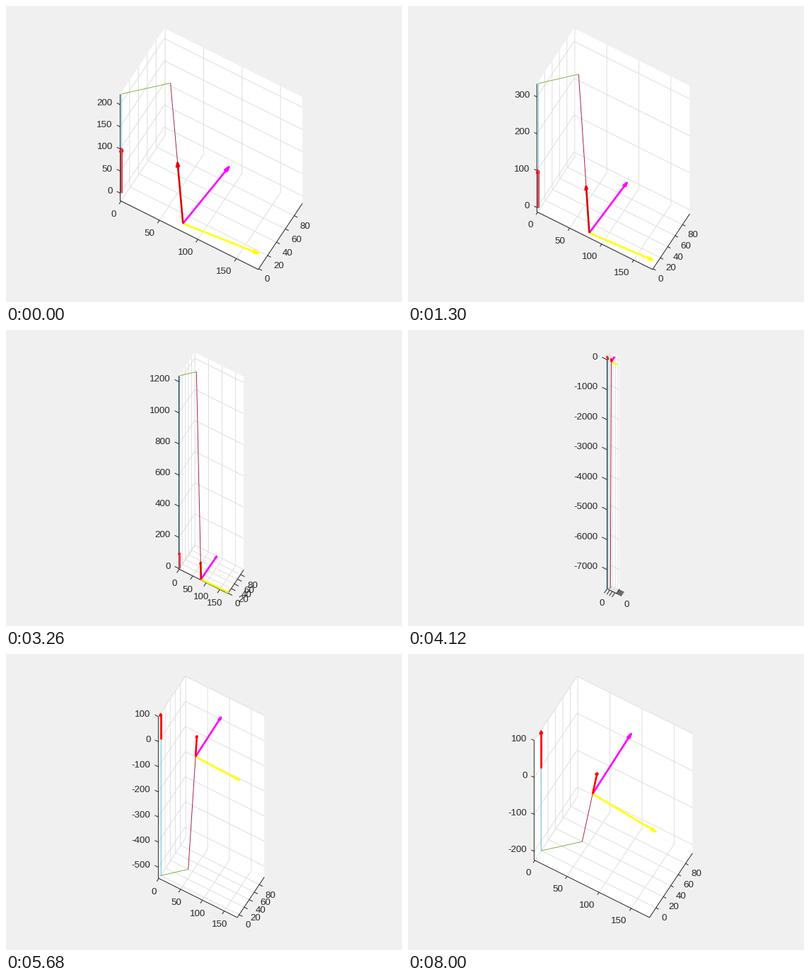
Write a matplotlib script that moves like this. It is 560 px wide and 420 px high and loops after 8.02 s.

```python
import numpy as np
import matplotlib.pyplot as plt
from matplotlib.animation import FuncAnimation
from matplotlib.collections import LineCollection, PolyCollection

W, H, DPI = 560, 420, 100
PX = 72 / DPI                      # one pixel in points
FRAMES, STEP_MS = 401, 20
CENTER = np.array([290.3, 202.7])
BOX_H = 342.3                      # height the projected box always fills
INK = "#262626"

# Orthographic view: azimuth 30, elevation 60
RIGHT = np.array([np.sqrt(3) / 2, 0.5, 0])
UP = np.array([-np.sqrt(3) / 4, 0.75, 0.5])
DIR_X = np.array([RIGHT[0], -UP[0]])
DIR_Y = np.array([RIGHT[1], -UP[1]])

ARM = 100                          # arrow length
TOOL = np.array([80.0, 0, 0])      # where the moving triad sits

fig = plt.figure(figsize=(W / DPI, H / DPI), dpi=DPI, facecolor="#f0f0f0")
ax = fig.add_axes([0, 0, 1, 1])
ax.set(xlim=(0, W), ylim=(H, 0))
ax.axis("off")

walls = ax.add_collection(PolyCollection([], facecolor="white", edgecolor="none", zorder=1))


def segments(color, width, order):
    lines = LineCollection([], colors=color, linewidths=width * PX, zorder=order)
    return ax.add_collection(lines)


grid = segments("#dfdfdf", 1, 2)
rulers = segments(INK, 1, 3)


def polyline(color, width, order):
    return ax.plot([], [], color=color, lw=width * PX, zorder=order,
                   solid_capstyle="butt", solid_joinstyle="round")[0]


arrows = [(polyline(c, 2.67, 4), polyline(c, 2.67, 4))
          for c in ("#ff0000", "#ffff00", "#ff00ff", "#ff0000")]
link_top = polyline("#77ac30", 0.9, 5)
link_post = polyline("#4dbeee", 0.75, 5)
link_tool = polyline("#a2142f", 0.9, 5)

labels = [ax.text(0, 0, "", family="Liberation Sans", size=13.33 * PX,
                  color=INK, va="center", zorder=6) for _ in range(32)]
power = [ax.text(0, y, t, family="Liberation Sans", size=size * PX, color=INK, zorder=6)
         for y, t, size in ((20, "×10", 13.33), (12, "4", 10.5))]


def pose(i):
    """Triad directions and elbow position for frame i (no elbow when level)."""
    a = np.radians((i - 200) * 0.05)
    s, c = np.sin(a), np.cos(a)
    axes = np.array([[c, 0, -s], [s * s, c, s * c], [s * c, -s, c * c]])
    elbow = None if i == 200 else TOOL - 40 / s * axes[2]
    return s, c, axes, elbow


def ticks(lo, hi, step):
    first, last = np.ceil(lo / step - 1e-6), np.floor(hi / step + 1e-6)
    return np.arange(first, last + 1) * step + 0.0


def z_step(span, px_per_unit):
    for mag in 10.0 ** np.arange(0, 6):
        for step in mag * np.array([1, 2, 5]):
            if step * px_per_unit >= 28 and span / step <= 9:
                return step


def draw(i):
    s, c, triad, elbow = pose(i)
    tips = TOOL + ARM * triad
    zs = [0, ARM, *tips[:, 2]] + ([] if elbow is None else [elbow[2]])
    lo = np.array([-1.1, min(-1.1, -ARM * s), min(zs)])
    hi = np.array([TOOL[0] + ARM * c, ARM * c, max(zs)])
    span, mid = hi - lo, (lo + hi) / 2
    scale = BOX_H / (np.abs(UP) @ span)

    def proj(*p):
        d = np.array(p, float) - mid
        return CENTER + scale * np.array([RIGHT @ d, -(UP @ d)])

    (x0, y0, z0), (x1, y1, z1) = lo, hi
    walls.set_verts([
        [proj(x0, y0, z0), proj(x1, y0, z0), proj(x1, y1, z0), proj(x0, y1, z0)],
        [proj(x0, y0, z0), proj(x0, y1, z0), proj(x0, y1, z1), proj(x0, y0, z1)],
        [proj(x0, y1, z0), proj(x1, y1, z0), proj(x1, y1, z1), proj(x0, y1, z1)],
    ])

    xt, yt = ticks(x0, x1, 50), ticks(y0, y1, 20)
    zt = ticks(z0, z1, z_step(span[2], scale / 2))
    # The y axis never shows its 100 mark
    yt = yt[yt < ARM]
    grid.set_segments(
        [[proj(x, y0, z0), proj(x, y1, z0), proj(x, y1, z1)] for x in xt]
        + [[proj(x1, y, z0), proj(x0, y, z0), proj(x0, y, z1)] for y in yt]
        + [[proj(x0, y0, z), proj(x0, y1, z), proj(x1, y1, z)] for z in zt])

    x_len = span[0] * scale * np.hypot(*DIR_X)
    z_len = span[2] * scale / 2
    tick = 0.025 * max(x_len, z_len)
    marks = [[proj(x0, y0, z1), proj(x0, y0, z0), proj(x1, y0, z0), proj(x1, y1, z0)]]
    notes = []

    def add_ticks(points, texts, way, offset, align):
        for p, t in zip(points, texts):
            end = p + tick * way
            marks.append([p, end])
            if t is not None:
                notes.append((end + offset, t, align))

    crowded = scale < 0.2

    def flat_texts(values):
        return [None if crowded and k else f"{v:.0f}" for k, v in enumerate(values)]

    align = "right" if x_len >= z_len else "center"
    add_ticks([proj(x, y0, z0) for x in xt], flat_texts(xt), -DIR_Y, (-3.7, 15), align)
    add_ticks([proj(x1, y, z0) for y in yt], flat_texts(yt), DIR_X, (3.5, 13), "left")
    big = np.abs(zt).max() > 10000
    z_texts = [f"{v / 1e4:g}" if big else f"{v:.0f}" for v in zt]
    add_ticks([proj(x0, y0, z) for z in zt], z_texts, -DIR_X, (-6, 0), "right")
    rulers.set_segments(marks)

    for text in labels:
        text.set_visible(False)
    for text, (p, t, side) in zip(labels, notes):
        text.set(position=p, text=t, ha=side, visible=True)
    left = proj(x0, y0, z1)[0]
    for text, dx in zip(power, (0, 23)):
        text.set_x(left + dx)
        text.set_visible(bool(big))

    starts = [np.zeros(3), TOOL, TOOL, TOOL]
    ways = [np.array([0, 0, 1.0]), *triad]
    for (shaft, head), start, way in zip(arrows, starts, ways):
        a, b = proj(*start), proj(*(start + ARM * way))
        shaft.set_data(*np.array([a, b]).T)
        d = b - a
        side = 1.7 * scale * np.array([-d[1], d[0]]) / np.hypot(*d)
        back = b - 0.07 * d
        head.set_data(*np.array([back + side, b, back - side, back + side]).T)

    for line in (link_post, link_top, link_tool):
        line.set_visible(elbow is not None)
    if elbow is not None:
        top, bend = proj(0, 0, elbow[2]), proj(*elbow)
        link_post.set_data(*np.array([proj(0, 0, 0), top]).T)
        link_top.set_data(*np.array([top, bend]).T)
        link_tool.set_data(*np.array([bend, proj(*TOOL)]).T)
    return []


anim = FuncAnimation(fig, draw, frames=FRAMES, interval=STEP_MS,
                     init_func=lambda: [], repeat=True, repeat_delay=0,
                     cache_frame_data=False)
plt.show()
```
